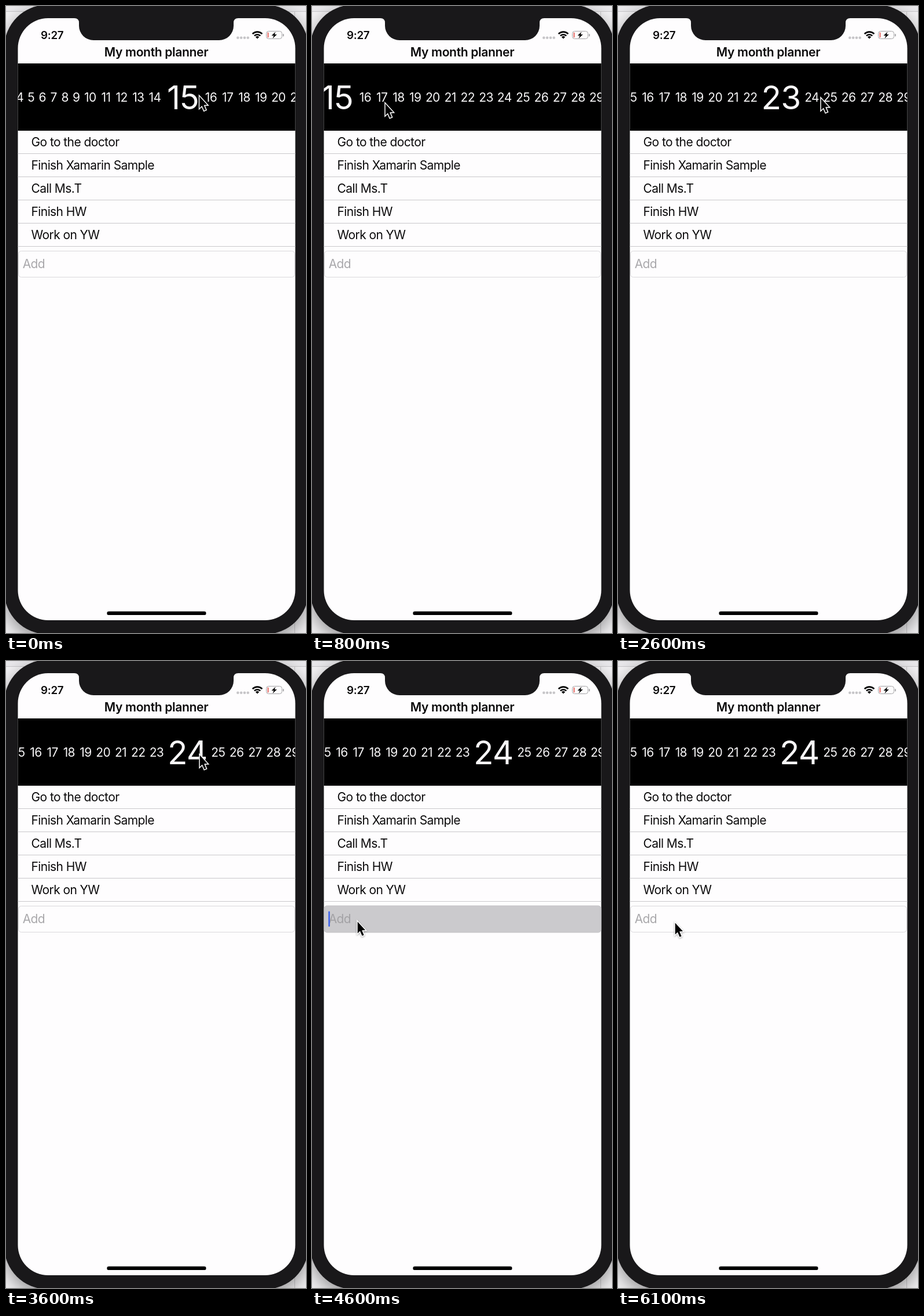
An HTML page with a canvas for the animation above (6200 ms loop, 518 px wide and 1081 px high).

```html
<!DOCTYPE html>
<html lang="en">
<head>
<meta charset="utf-8">
<title>My month planner</title>
<style>
  html, body { margin: 0; width: 100%; height: 100%; overflow: hidden; background: #fefdfe; }
  canvas { display: block; width: 518px; height: 1081px; }
</style>
</head>
<body>
<canvas id="stage" width="518" height="1081"></canvas>
<script>
const ctx = document.getElementById('stage').getContext('2d');
const LOOP = 6200, STEP = 100;
const FONT = 'Inter, "Open Sans", sans-serif';
const BEZEL = '#19181a', PAPER = '#fefdfe', LINE = '#c9c8cb';
const TODOS = ['Go to the doctor', 'Finish Xamarin Sample', 'Call Ms.T', 'Finish HW', 'Work on YW'];
const DAY_GAP = 7.25;

const ARROW = new Path2D('M1.7 3.6V23.4L5.9 19.4L9.5 27.8L12.6 26.5L9.1 18.2L15 18Z');
const BOLT = new Path2D('M465.5 44.5L458.5 51H462.3L460.5 56L467.8 49H463.8Z');

// Where the pointer rests, and when it travels there.
const MOVES = [
  { from: 0, to: 300, x: 400, y: 153 },
  { from: 400, to: 800, x: 125, y: 165 },
  { from: 800, to: 1100, x: 285, y: 147 },
  { from: 1500, to: 1700, x: 298, y: 153 },
  { from: 1900, to: 2600, x: 349, y: 156 },
  { from: 2900, to: 3300, x: 333, y: 159 },
  { from: 3600, to: 4200, x: 77, y: 446 },
  { from: 4600, to: 5200, x: 97, y: 491 },
  { from: 5500, to: 5800, x: 97, y: 448 }
];

function ease(t, from, to) {
  const p = Math.min(1, Math.max(0, (t - from) / (to - from)));
  return p * p * (3 - 2 * p);
}

function pointerAt(t) {
  let x = 332.5, y = 152.5;
  for (const move of MOVES) {
    const e = ease(t, move.from, move.to);
    x += (move.x - x) * e;
    y += (move.y - y) * e;
  }
  return [x, y];
}

function rect(x, y, w, h, color) {
  ctx.fillStyle = color;
  ctx.fillRect(x, y, w, h);
}

function rounded(x, y, w, h, r, fill, stroke) {
  ctx.beginPath();
  ctx.roundRect(x, y, w, h, r);
  if (fill) { ctx.fillStyle = fill; ctx.fill(); }
  if (stroke) { ctx.strokeStyle = stroke; ctx.lineWidth = 1; ctx.stroke(); }
}

function setShadow(color, blur, offset) {
  ctx.shadowColor = color;
  ctx.shadowBlur = blur;
  ctx.shadowOffsetY = offset;
}

function label(str, x, y, { size = 21, weight = 400, color = '#0b0a0b', align = 'left' } = {}) {
  const tracking = weight > 400 || size > 40 ? -0.015 : -0.028;
  ctx.font = `${weight} ${size}px ${FONT}`;
  ctx.letterSpacing = `${tracking * size}px`;
  ctx.textAlign = align;
  ctx.fillStyle = color;
  ctx.fillText(str, x, y);
}

function drawPhone() {
  rect(0, 0, 518, 1081, '#f3f2f4');
  rect(0, 0, 518, 9, '#e9e8eb');
  rect(0, 9, 518, 1, LINE);
  rect(498, 10, 1, 1071, LINE);
  ctx.save();
  setShadow('rgba(0,0,0,0.4)', 30, 10);
  rounded(-3, -2, 525, 1085, 74, BEZEL);
  ctx.restore();
  rounded(20.5, 21, 479, 1038, 52, PAPER);

  ctx.fillStyle = BEZEL;
  ctx.beginPath();
  ctx.moveTo(118, 20);
  ctx.lineTo(118, 21);
  ctx.quadraticCurveTo(126, 21, 126, 29);
  ctx.arcTo(126, 59, 150, 59, 25);
  ctx.arcTo(393, 59, 393, 34, 25);
  ctx.lineTo(393, 29);
  ctx.quadraticCurveTo(393, 21, 401, 21);
  ctx.lineTo(401, 20);
  ctx.fill();
  rounded(174.3, 1043.7, 171.2, 6.4, 3.2, '#000');
}

function drawStatusBar() {
  label('9:27', 60, 56.5, { size: 18.8, weight: 600 });
  for (let i = 0; i < 4; i++) rounded(398 + i * 5.8, 52.5, 4.6, 4.6, 2.3, '#c6c5c8');

  const wave = (radius, width) => {
    ctx.beginPath();
    ctx.arc(434, 56.5, radius, -Math.PI * 0.75, -Math.PI * 0.25);
    ctx.lineWidth = width;
    ctx.strokeStyle = '#000';
    ctx.stroke();
  };
  wave(11.8, 2.7);
  wave(7.3, 2.6);
  wave(2.2, 4.4);

  rounded(449.5, 43.5, 27, 13, 4, null, '#a3a2a5');
  rounded(451.5, 45.5, 2, 9, 1, '#e5655f');
  rounded(478, 48, 1.8, 4.5, 1, '#a3a2a5');
  ctx.fillStyle = '#000';
  ctx.fill(BOLT);
}

// The digit 1 is narrow; all others share one width.
function dayWidth(day, selected) {
  const plain = [...String(day)].reduce((sum, d) => sum + (d === '1' ? 9.2 : 12.25), 0);
  return day === selected ? plain * 2.1 + 16 : plain;
}

function drawDays(selected, edge) {
  ctx.save();
  ctx.beginPath();
  ctx.rect(20.5, 99, 479, 116);
  ctx.clip();
  rect(20, 99, 480, 116, '#000');
  let x = edge;
  for (let day = 1; day < 15; day++) x -= dayWidth(day, selected) + DAY_GAP;
  for (let day = 1; day <= 31; day++) {
    const width = dayWidth(day, selected);
    const size = day === selected ? 56.5 : 21;
    label(String(day), x + width / 2, 157.3 + size * 0.364, { size, color: '#f8f7f8', align: 'center' });
    x += width + DAY_GAP;
  }
  ctx.restore();
}

function drawTodos() {
  TODOS.forEach((todo, i) => {
    label(todo, 43.5, 242.3 + i * 40);
    rect(20.5, 254 + i * 40, 479, 1, LINE);
  });
}

function drawEntry(focused, caret) {
  if (focused) rounded(21, 422, 478, 46, 5, '#cbcacd', '#c3c2c5');
  else rounded(21.5, 422.5, 477, 45, 5, PAPER, '#d9d8db');
  label('Add', 28.7, 452.3, { color: focused ? '#a3a2a5' : '#a9a8ab' });
  if (focused) {
    ctx.globalAlpha = caret;
    rounded(28.3, 431.5, 2.6, 26.5, 1, '#3b62ee');
    ctx.globalAlpha = 1;
  }
}

function drawPointer(x, y) {
  ctx.save();
  ctx.translate(x, y);
  ctx.lineWidth = 3;
  ctx.strokeStyle = '#fff';
  setShadow('rgba(0,0,0,0.35)', 3, 1);
  ctx.stroke(ARROW);
  ctx.shadowColor = 'transparent';
  ctx.fillStyle = '#000';
  ctx.fill(ARROW);
  ctx.restore();
}

function draw(t) {
  const selected = t < 2000 ? 15 : t < 3600 ? 23 : 24;
  const edge = 275 - 262 * ease(t, 400, 800) - ease(t, 800, 1000);
  drawPhone();
  drawStatusBar();
  label('My month planner', 259.5, 87.3, { weight: 600, align: 'center' });
  drawDays(selected, edge);
  drawTodos();
  drawEntry(t >= 4600 && t < 5500, 1 - ease(t, 5000, 5300));
  drawPointer(...pointerAt(t));
}

const start = performance.now();
function tick() {
  const t = (performance.now() - start) % LOOP;
  draw(Math.floor(t / STEP) * STEP);
  requestAnimationFrame(tick);
}
tick();
</script>
</body>
</html>
```
